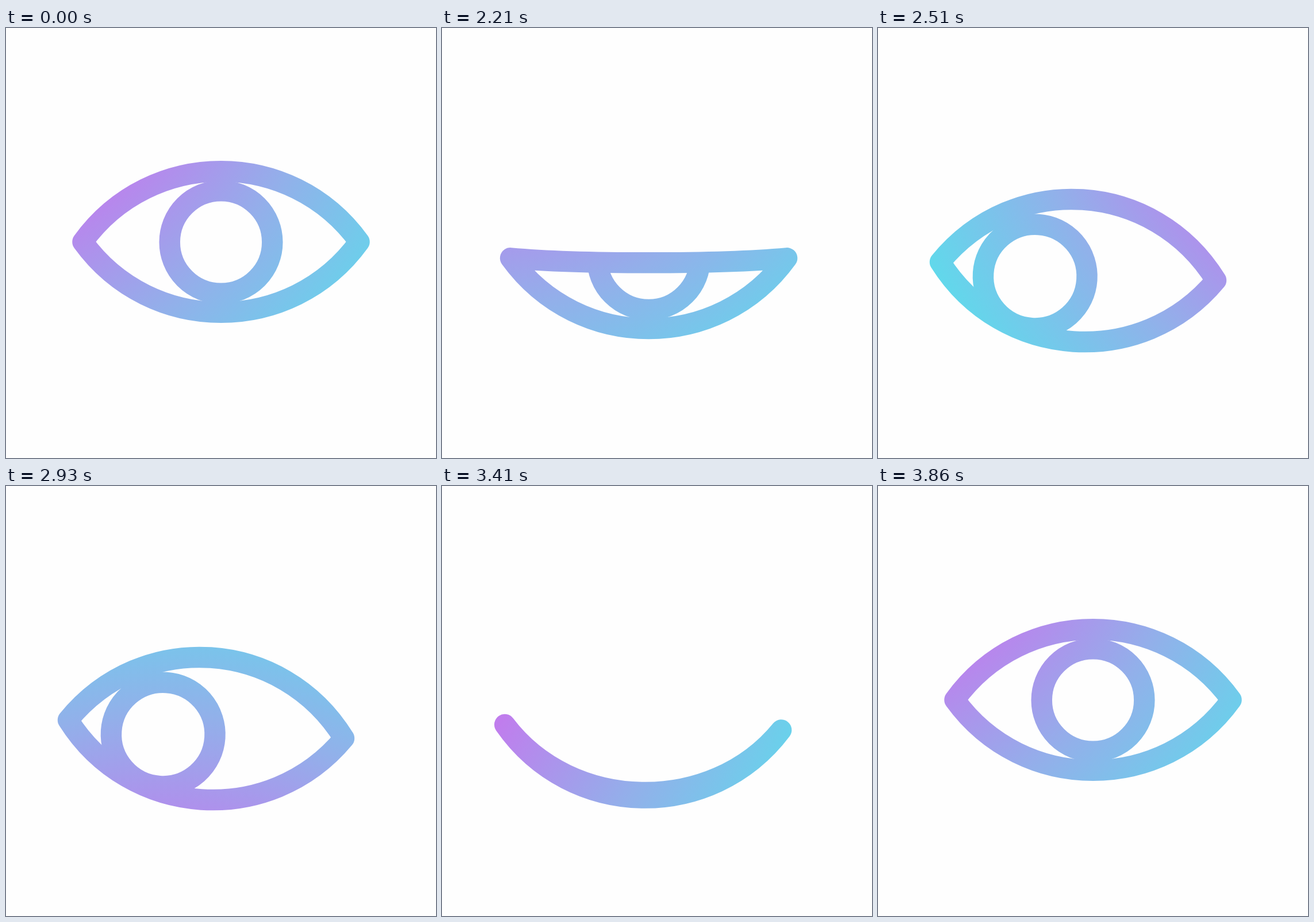
Animation of 748x748 px, one loop 3890 ms. Source, as an HTML page with a canvas:

```html
<!DOCTYPE html>
<html lang="en">
<head>
<meta charset="utf-8">
<title>Blinking eye</title>
<style>
  html, body { margin: 0; width: 100%; height: 100%; overflow: hidden; background: #fefefe; }
  canvas { display: block; width: 748px; height: 748px; }
</style>
</head>
<body>
<canvas id="stage" width="748" height="748"></canvas>
<script>
const ctx = document.getElementById('stage').getContext('2d');
const SIZE = 748, LOOP = 3890, START = 2030, END = 3860, STEP = 30;
const HALF = 240.5, SAG = 122.7, HANDLE = 118.6, LINE = 36.5, IRIS = 89.3;
const RECOIL = .13, RAD = Math.PI / 180;

const part = (t, from, to) => Math.min(1, Math.max(0, (t - from) / (to - from)));
const smooth = u => u * u * (3 - 2 * u);
const ease = (t, from, to) => smooth(part(t, from, to));
// Rises to 1, then falls back to 0.
const pulse = (t, a, b, c, d) => ease(t, a, b) - ease(t, c, d);

function poseAt(t) {
  // The eye recoils before it leaves and overshoots when it returns.
  const away = (1 + RECOIL) * pulse(t, 2090, 2300, 3370, 3650)
    - RECOIL * pulse(t, 1985, 2090, 3650, END);
  const glance = pulse(t, 2210, 2450, 3250, 3500);
  const shut = pulse(t, 2090, 2320, 2320, 2510) + pulse(t, 3190, 3390, 3390, 3565);
  const turn = smooth(1 - (1 - part(t, START, END)) ** 1.42);
  return {
    x: SIZE / 2 - 26 * away,
    y: 372 + 51 * away,
    tilt: 3.8 * RAD * glance,
    lid: SAG * (1 - 2 * shut) + 2 * glance - 64 * Math.min(0, away),
    irisX: -74 * glance,
    irisY: .5 + 13.5 * glance,
    irisR: IRIS + glance,
    spin: (39 + 360 * turn) * RAD
  };
}

function gradient(angle) {
  const reach = 700, spread = 260;
  const x = 45 - reach * Math.cos(angle), y = -15 - reach * Math.sin(angle);
  const g = ctx.createRadialGradient(x, y, reach - spread, x, y, reach + spread);
  g.addColorStop(0, 'rgb(192,125,237)');
  g.addColorStop(.5, 'rgb(146,176,234)');
  g.addColorStop(1, 'rgb(96,217,235)');
  return g;
}

function lens(lid) {
  const up = -lid / .75, down = SAG / .75, inner = HALF - HANDLE;
  const p = new Path2D();
  p.moveTo(-HALF, 0);
  p.bezierCurveTo(-inner, up, inner, up, HALF, 0);
  p.bezierCurveTo(inner, down, -inner, down, -HALF, 0);
  p.closePath();
  return p;
}

function draw(t) {
  const pose = poseAt(t), shape = lens(pose.lid);

  ctx.fillStyle = '#fefefe';
  ctx.fillRect(0, 0, SIZE, SIZE);
  ctx.save();
  ctx.translate(pose.x, pose.y);
  ctx.rotate(pose.tilt);
  ctx.strokeStyle = gradient(pose.spin - pose.tilt);
  ctx.lineWidth = LINE;
  ctx.lineJoin = 'round';

  ctx.save();
  ctx.clip(shape);
  ctx.beginPath();
  ctx.arc(pose.irisX, pose.irisY, pose.irisR, 0, 2 * Math.PI);
  ctx.stroke();
  ctx.restore();

  ctx.stroke(shape);
  ctx.restore();
}

const origin = performance.now();
function tick() {
  const t = (performance.now() - origin) % LOOP;
  draw(t < START ? END : START + Math.floor((t - START) / STEP) * STEP);
  requestAnimationFrame(tick);
}
tick();
</script>
</body>
</html>
```
